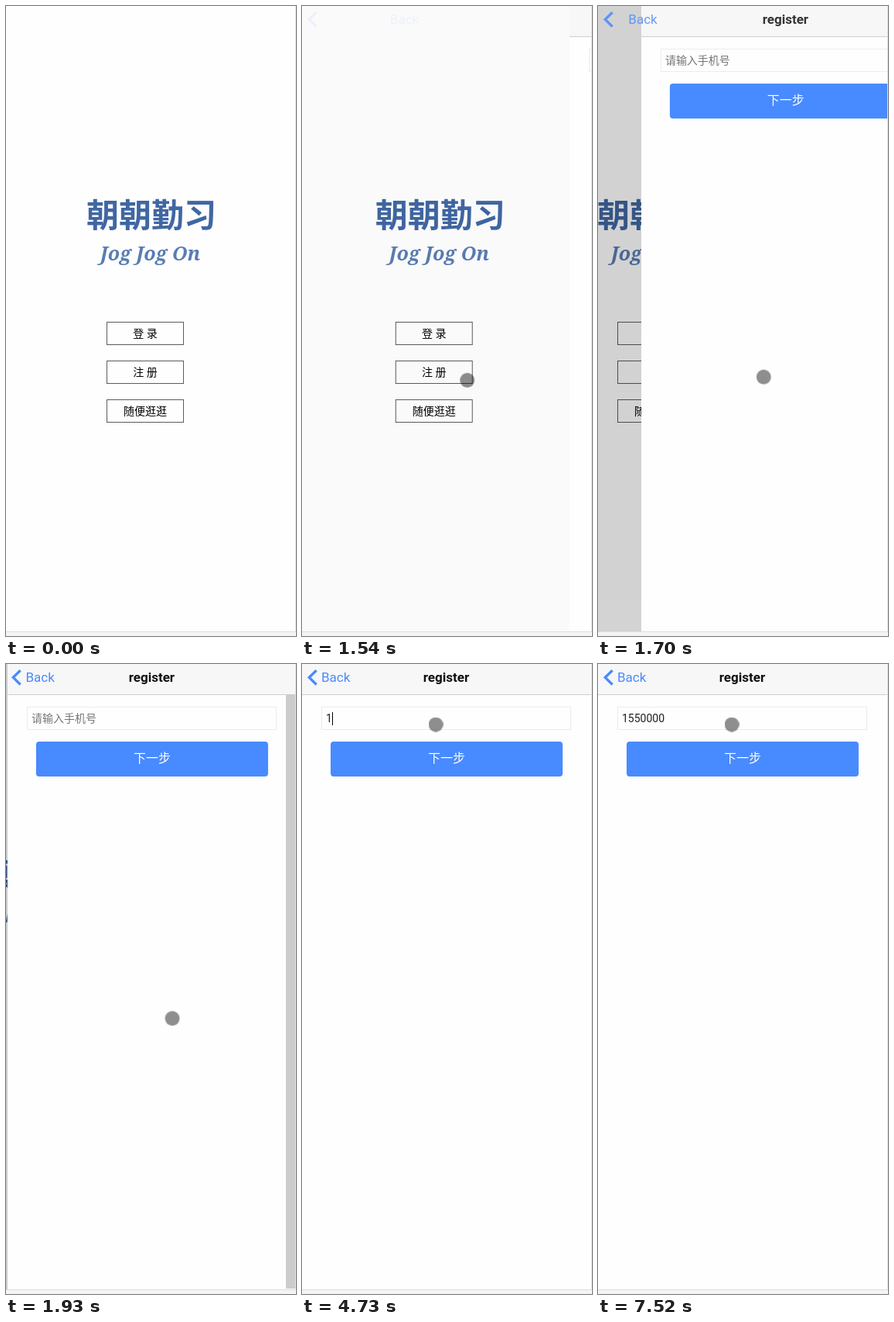
An HTML page that plays this animation: 375x812 px, repeating every 8000 ms.

```html
<!DOCTYPE html>
<html lang="zh-CN">
<head>
<meta charset="utf-8">
<title>Register</title>
<style>
html, body { margin: 0; width: 100%; height: 100%; overflow: hidden; background: #f4f4f4; }
body { font-family: Roboto, "Noto Sans CJK SC", "Noto Sans CJK", sans-serif; }
#stage { --t: 0; position: relative; width: 375px; height: 812px; overflow: hidden; background: #f4f4f4; }
#stage div, #stage svg { position: absolute; box-sizing: border-box; white-space: nowrap; }
#phone { left: 0; top: 0; width: 375px; height: 807px; overflow: hidden; background: #000;
  border: solid #dedede; border-width: 0 1px 1px 0; }
.page { left: 0; top: 0; width: 374px; height: 806px; background: #fefefe; }

/* Every animation is paused and driven through --t (ms). */
.page, .fade, .label, #dot { animation: 500ms cubic-bezier(.36, .66, .04, 1) calc(1525ms - var(--t) * 1ms) both paused; }
#home { animation-name: leave; }
#form { animation-name: enter; }
.fade { animation-name: fade; }
.label { animation-name: label; }
@keyframes leave { to { transform: translateX(-33%); opacity: .8; } }
@keyframes enter { from { transform: translateX(100%); } to { transform: none; } }
@keyframes fade { from { opacity: 0; } }
@keyframes label { from { transform: translateX(96px); } }

.name { left: 104px; top: 241px; font: bold 42px/60px Roboto, "Noto Sans CJK SC", "Noto Sans CJK", sans-serif; color: #4067a3; }
.motto { left: 0; top: 298px; width: 373px; text-align: center; font: italic bold 25px/40px "Noto Serif", serif; color: #587db2; }
.choice { left: 130px; width: 100px; height: 30px; border: 1px solid #5c5c5c; text-align: center;
  font-size: 14px; line-height: 28px; font-weight: 500; color: #000; }

.bar { left: 0; top: 0; width: 374px; height: 40px; background: #f7f7f7; border-bottom: 1px solid #cdcdcd; }
.title { left: 0; top: 7px; width: 373px; text-align: center; font-size: 17px; line-height: 20px; font-weight: 600; color: #111; }
.back { left: 0; top: 0; color: #488aff; }
.label { left: 25px; top: 7px; font-size: 17px; line-height: 20px; }
.field { left: 25px; top: 55px; width: 323px; height: 30px; border: 1px solid #ececec; }
#text { left: 31px; top: 55px; font-size: 14px; line-height: 30px; }
#caret { top: 62px; width: 1px; height: 17px; background: #000; }
.next { left: 37px; top: 100px; width: 300px; height: 45px; border-radius: 4px; background: #488aff;
  color: #fff; text-align: center; font-size: 16px; line-height: 44px; }
#gutter { left: 359.5px; top: 40px; width: 12.5px; height: 765px; background: #ccc; }

#dot { left: -9.5px; top: -9.5px; width: 19px; height: 19px; border-radius: 50%; background: rgba(0, 0, 0, .44);
  animation: path 8s linear calc(var(--t) * -1ms) both paused; }
@keyframes path {
  0%, .87% { transform: translate(294.5px, 739.5px); }
  3.75% { transform: translate(245px, 590px); }
  6.6% { transform: translate(212px, 482px); }
  9.6%, 10.6% { transform: translate(200.5px, 448.5px); }
  11.5% { transform: translate(207px, 460px); }
  13.5% { transform: translate(211.5px, 466.5px); }
  20.3% { transform: translate(213.5px, 484.5px); }
  24.15% { transform: translate(214.5px, 456.5px); }
  27% { transform: translate(235px, 335px); }
  28% { transform: translate(240px, 290px); }
  30% { transform: translate(222px, 190px); }
  31.9% { transform: translate(185.5px, 99.5px); }
  32.9% { transform: translate(178px, 86px); }
  33.85% { transform: translate(169.5px, 74.5px); }
  34.8% { transform: translate(174.5px, 79.5px); }
  36.75%, 100% { transform: translate(172.5px, 77.5px); }
}
</style>
</head>
<body>
<div id="stage">
  <div id="phone">
    <div class="page" id="home">
      <div class="name">朝朝勤习</div>
      <div class="motto">Jog Jog On</div>
      <div class="choice" style="top:407px">登 录</div>
      <div class="choice" style="top:457px">注 册</div>
      <div class="choice" style="top:507px">随便逛逛</div>
    </div>
    <div class="page" id="form">
      <div class="bar"></div>
      <div class="title fade">register</div>
      <div class="field"></div>
      <div id="text"></div>
      <div id="caret"></div>
      <div class="next">下一步</div>
      <div id="gutter"></div>
    </div>
    <div class="back fade">
      <svg width="24" height="36" style="left:0;top:0"><path d="M18.6 8.2 9.3 17.3l9.3 9.2" fill="none" stroke="#488aff" stroke-width="3.3"/></svg>
      <div class="label">Back</div>
    </div>
    <div id="dot"></div>
  </div>
</div>
<script>
const LOOP = 8000, STEP = 77.6, DIGIT = 7.86;
const NUMBER = '1550000', HINT = '请输入手机号';
const keys = [4730, 5740, 6000, 6510, 6660, 6910, 7060];
const caretOn = [[2940, 3410], [3960, 4420], [4730, 5190], [5740, 6430], [6510, 7520]];
const $ = id => document.getElementById(id);
const show = (id, on) => { $(id).style.visibility = on ? 'visible' : 'hidden'; };

function draw(t) {
  const n = Math.floor((t - 55) / STEP);
  const tick = Math.max(0, 70 + n * STEP);
  $('stage').style.setProperty('--t', tick.toFixed(1));
  show('dot', n >= 0);
  show('gutter', tick > 1525 && tick < 2030);

  const typed = keys.filter(k => t >= k).length;
  $('text').textContent = typed ? NUMBER.slice(0, typed) : HINT;
  $('text').style.color = typed ? '#222' : '#757575';
  $('caret').style.left = Math.round(31 + typed * DIGIT) + 'px';
  show('caret', caretOn.some(([a, b]) => t >= a && t < b));
}

const start = performance.now();
function loop() {
  draw((performance.now() - start) % LOOP);
  requestAnimationFrame(loop);
}
loop();
</script>
</body>
</html>
```
